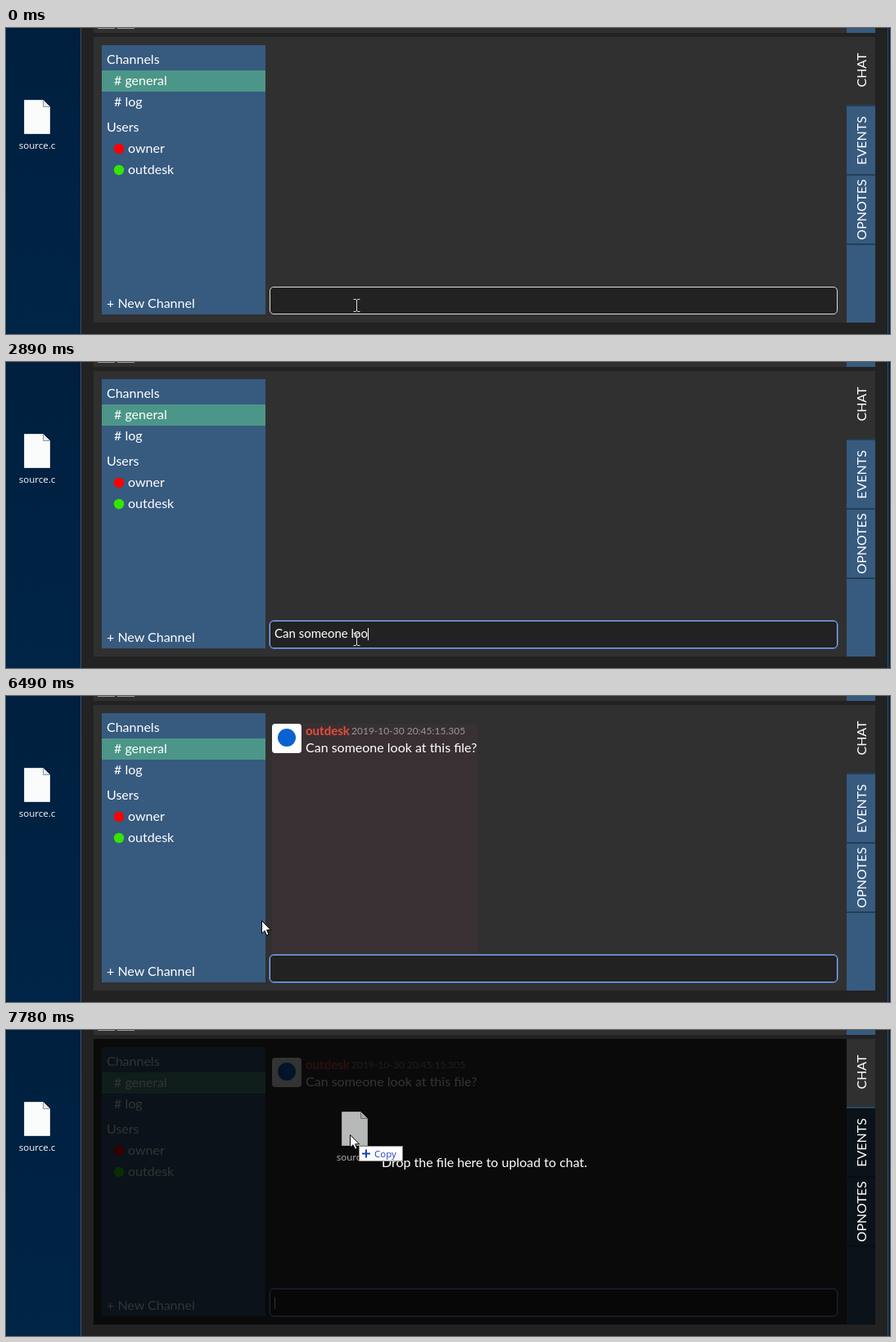
These frames come from a looping animation (1080x375 px, 8000 ms). An HTML page:

```html
<!DOCTYPE html>
<html lang="en">
<head>
<meta charset="utf-8">
<title>Chat upload</title>
<style>
  html, body { margin: 0; width: 100%; height: 100%; overflow: hidden; background: #002142; }
  svg { display: block; width: 1080px; height: 375px; }
  text { fill: #fff; font: 16px Lato, sans-serif; white-space: pre; }
  .small { font: 11.5px "Open Sans", "Noto Sans", sans-serif; }
  .tab { text-anchor: middle; }
</style>
</head>
<body>
<svg viewBox="0 0 1080 375">
  <defs>
    <linearGradient id="sky" x2="0" y2="1">
      <stop stop-color="#001f3f"/><stop offset="1" stop-color="#002546"/>
    </linearGradient>
    <g id="file">
      <path d="M22.5 88.5H45.5L53.5 96.5V129.5H22.5Z" fill="#fafcfb" stroke="#d5dadb"/>
      <path d="M45.5 88.5V96.5H53.5" fill="#e4e8e8" stroke="#8d9699"/>
      <text class="small" x="38" y="148" text-anchor="middle">source.c</text>
    </g>
  </defs>

  <rect width="1080" height="375" fill="url(#sky)"/>
  <rect id="pick" x="2.5" y="84.5" width="71" height="67" fill="#5f9cc4" stroke="#6fa3c6"/>
  <use href="#file"/>

  <!-- window -->
  <rect x="91" width="987" height="375" fill="#222"/>
  <path id="frame" d="M91.5 0V375M1077.5 0V375"/>
  <path d="M107 0H1062V6H107ZM107 11H1062V361H107Z" fill="#303030"/>
  <path d="M112 .5H133M136 .5H157" stroke="#9a9a9a"/>
  <path d="M1027 0H1062V6H1027ZM1027 96H1062V361H1027ZM117 21H317V351H117Z" fill="#375a7f"/>
  <path d="M1027 95H1062M1027 180H1062M1027 265H1062" stroke="#223f55" stroke-width="2"/>

  <!-- sidebar -->
  <rect x="117" y="52" width="200" height="26" fill="#4b9688"/>
  <text x="123" y="44">Channels</text>
  <text x="132" y="70"># general</text>
  <text x="132" y="96"># log</text>
  <text x="123" y="127">Users</text>
  <circle cx="138" cy="148" r="6.2" fill="#f00"/>
  <text x="149" y="153">owner</text>
  <circle cx="138" cy="174" r="6.2" fill="#33e600"/>
  <text x="149" y="179">outdesk</text>
  <text x="123" y="343">+ New Channel</text>

  <g id="message">
    <rect x="325" y="34" width="251" height="283" fill="#383033"/>
    <rect x="325" y="34" width="36" height="36" rx="4" fill="#fff"/>
    <circle cx="343" cy="51" r="11" fill="#0a62d0"/>
    <text x="366" y="48" style="font-size:15px;font-weight:700;fill:#e74c3c">outdesk</text>
    <text x="422" y="47" style="font-size:12px;fill:#999">2019-10-30 20:45:15.305</text>
    <text x="366" y="69">Can someone look at this file?</text>
  </g>

  <rect id="ring" x="321.5" y="316.5" width="695" height="35" rx="5.5" fill="none" stroke="#3c5f9e"/>
  <rect id="input" x="322.5" y="317.5" width="693" height="33" rx="4.5" fill="#222"/>
  <text id="typed" x="328" y="338" style="font-size:15px"></text>
  <rect id="caret" width="1" height="15" fill="#fff"/>

  <g id="drop">
    <path d="M107 11H1027V96H1062V361H107Z" fill-opacity=".8"/>
    <path d="M1027 95H1062" stroke="#1f4a66" stroke-width="2"/>
    <text class="tab" x="584.5" y="168">Drop the file here to upload to chat.</text>
  </g>
  <text class="tab" transform="translate(1051 51.5) rotate(-90)">CHAT</text>
  <text class="tab" transform="translate(1051 138) rotate(-90)">EVENTS</text>
  <text class="tab" transform="translate(1051 222.5) rotate(-90)">OPNOTES</text>

  <use id="ghost" href="#file" opacity=".72"/>
  <path id="beam" d="M-3.5-7.5H-1L.5-6.5 2-7.5H4.5M.5-6.5V6.5M-3.5 7.5H-1L.5 6.5 2 7.5H4.5" fill="none" stroke="#ddd"/>
  <path id="arrow" d="M.5.5V16L4 12.7 6.5 18.3 9 17.2 6.6 11.8H11.5Z" fill="#fff" stroke="#000"/>
  <g id="tip">
    <rect x=".5" y=".5" width="53" height="18" fill="#fff" stroke="#8a8a8a"/>
    <path d="M4 9.5H14M9 4.5V14.5" stroke="#1c3fb5" stroke-width="2"/>
    <text class="small" x="19" y="13.5" style="fill:#1c3fc4">Copy</text>
  </g>
</svg>
<script>
const $ = id => document.getElementById(id);
const line = "Can someone look at this file?";
// [time, characters typed]
const typing = [[0, 0], [1070, 1], [1320, 2], [1590, 5], [1840, 7], [2090, 9], [2370, 12],
  [2640, 13], [2890, 15], [3140, 18], [3930, 21], [4180, 24], [4450, 27], [4700, 29],
  [5200, 30], [5470, 0]];
// [time, x, y] of the pointer
const pointer = [[0, 428, 340], [5970, 420, 323], [6240, 312, 275], [6500, 184, 222],
  [6740, 70, 170], [7010, 37, 122], [7280, 33, 118], [7530, 239, 132], [7780, 420, 128]];
const caretOff = [[790, 1070], [3660, 3930], [5970, 6500], [7010, 7530]];

const at = (steps, t) => steps.findLast(s => s[0] <= t);
const show = (id, on) => $(id).style.display = on ? "" : "none";
const move = (id, x, y) => $(id).setAttribute("transform", `translate(${x} ${y})`);

function draw(t) {
  const focus = t >= 270, drag = t >= 7530, last = t >= 7780;
  const count = at(typing, t)[1];
  const [, x, y] = at(pointer, t);

  $("frame").setAttribute("stroke", focus ? "#3d5369" : "#424d59");
  $("input").setAttribute("stroke", focus ? "#8fb0ee" : "#dcdcdc");
  show("ring", focus);
  $("typed").textContent = line.slice(0, count);
  const end = count ? $("typed").getComputedTextLength() : 0;
  move("caret", Math.round(328 + end), count ? 326 : 327);
  show("caret", focus && !caretOff.some(([a, b]) => t >= a && t < b));
  show("message", t >= 5470);

  show("beam", t < 6240);
  show("arrow", t >= 6240);
  move("beam", x, y);
  move("arrow", x, y);

  show("pick", t >= 7010 && !drag);
  $("pick").setAttribute("opacity", t < 7280 ? .3 : .45);
  ["drop", "ghost", "tip"].forEach(id => show(id, drag));
  move("ghost", last ? 388 : 185, last ? 12 : 15);
  move("tip", last ? 431 : 228, last ? 142 : 145);
}

function frame(now) {
  draw(now % 8000);
  requestAnimationFrame(frame);
}
draw(0);
requestAnimationFrame(frame);
</script>
</body>
</html>
```
